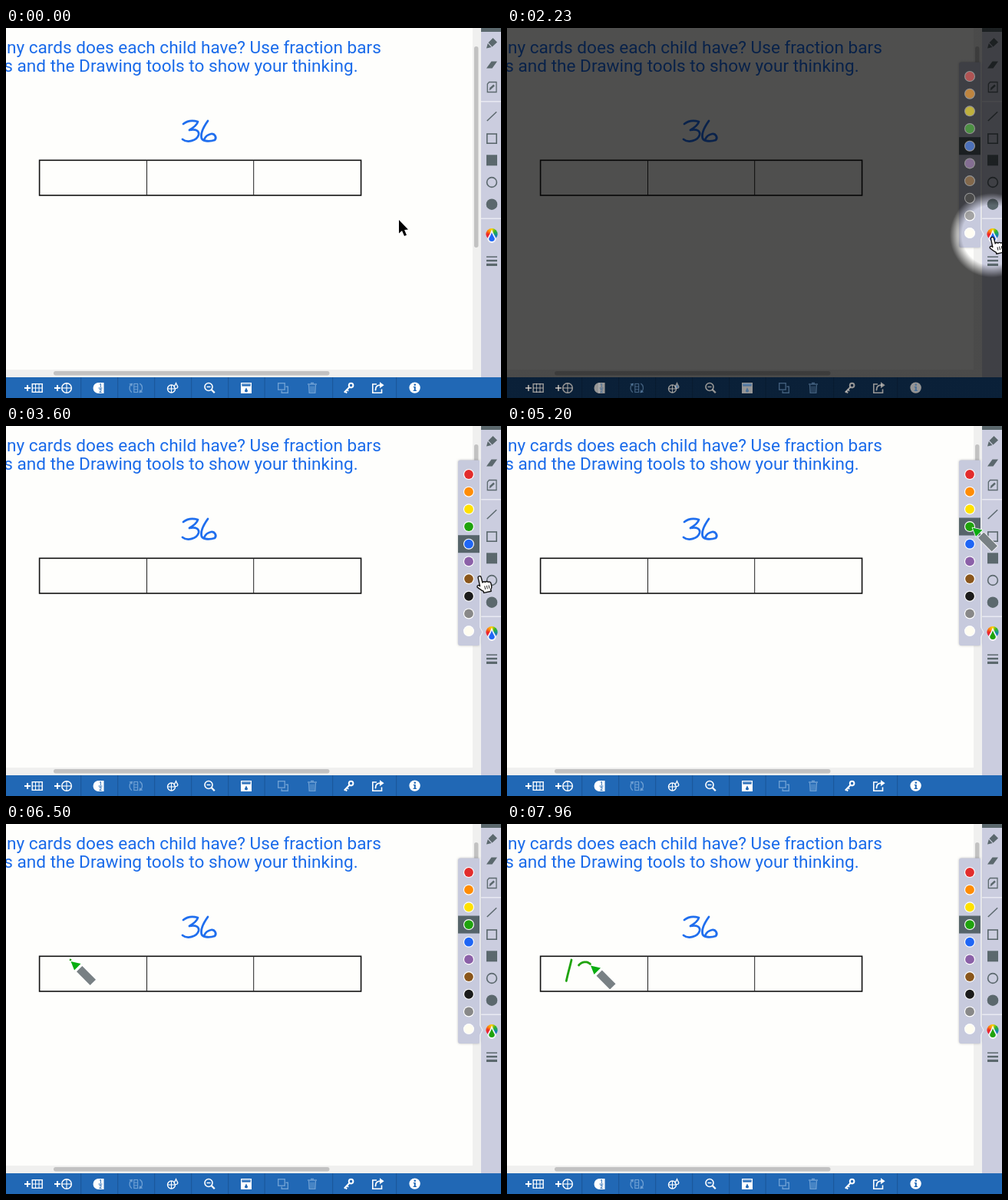
Recreate the animation shown at these times as an HTML page with a canvas. Size 645 px wide and 482 px high, loop 8 s.

```html
<!DOCTYPE html>
<html lang="en">
<head>
<meta charset="utf-8">
<title>Fraction bars</title>
<style>
html, body { margin: 0; width: 100%; height: 100%; overflow: hidden; background: #fefefc; }
canvas { display: block; }
</style>
</head>
<body>
<canvas id="stage" width="645" height="482"></canvas>
<script>
const ctx = document.getElementById('stage').getContext('2d');
const LOOP = 8000;
const INK = '#5b686d', BLUE = '#1f66f5', GREEN = '#1fa30c', BAR = '#2168b5', FADED = '#6d9fd3';
const PALETTE = ['#e22c2c', '#ff8c05', '#ffe100', GREEN, BLUE, '#8b60a8', '#8a561c', '#1b1b1b', '#888888', '#fffdf1'];
const LIGHT = { x: 632, y: 270 };

// Helpers
const clamp = v => Math.max(0, Math.min(1, v));
const part = (t, a, b) => clamp((t - a) / (b - a));
const ease = p => p * p * (3 - 2 * p);
const mix = (a, b, p) => [a[0] + (b[0] - a[0]) * p, a[1] + (b[1] - a[1]) * p];

function box(x, y, w, h, color) {
  ctx.fillStyle = color;
  ctx.fillRect(x, y, w, h);
}
function frame(x, y, w, h, color, width) {
  ctx.strokeStyle = color;
  ctx.lineWidth = width;
  ctx.strokeRect(x, y, w, h);
}
function line(points, color, width, close) {
  ctx.beginPath();
  points.forEach(p => ctx.lineTo(p[0], p[1]));
  if (close) ctx.closePath();
  ctx.strokeStyle = color;
  ctx.lineWidth = width;
  ctx.stroke();
}
function poly(points, color) {
  ctx.beginPath();
  points.forEach(p => ctx.lineTo(p[0], p[1]));
  ctx.closePath();
  ctx.fillStyle = color;
  ctx.fill();
}
function disc(x, y, r, color) {
  ctx.beginPath();
  ctx.arc(x, y, r, 0, 7);
  ctx.fillStyle = color;
  ctx.fill();
}
function ring(x, y, r, color, width, from = 0, to = Math.PI * 2) {
  ctx.beginPath();
  ctx.arc(x, y, r, from, to);
  ctx.strokeStyle = color;
  ctx.lineWidth = width;
  ctx.stroke();
}
function pill(x, y, w, h, r, color) {
  ctx.beginPath();
  ctx.roundRect(x, y, w, h, r);
  ctx.fillStyle = color;
  ctx.fill();
}
function label(text, x, y, font, color, align) {
  ctx.font = font;
  ctx.fillStyle = color;
  ctx.textAlign = align;
  ctx.fillText(text, x, y);
}
function drop(x, y, h, color) {
  const r = h * 0.33;
  ctx.beginPath();
  ctx.moveTo(x, y);
  ctx.quadraticCurveTo(x + r * 0.4, y + h * 0.35, x + r, y + h - r);
  ctx.arc(x, y + h - r, r, 0, Math.PI);
  ctx.quadraticCurveTo(x - r * 0.4, y + h * 0.35, x, y);
  ctx.fillStyle = color;
  ctx.fill();
}
function pen(d, color, width) {
  ctx.strokeStyle = color;
  ctx.lineWidth = width;
  ctx.lineCap = ctx.lineJoin = 'round';
  ctx.stroke(new Path2D(d));
  ctx.lineCap = 'butt';
  ctx.lineJoin = 'miter';
}

// Worksheet
function drawPage() {
  box(0, 0, 645, 482, '#fefefc');
  const font = '22.6px Roboto, sans-serif';
  label('any cards does each child have? Use fraction bars', 488.8, 32.5, font, '#1a6bea', 'right');
  label('s and the Drawing tools to show your thinking.', 458.6, 56.5, font, '#1a6bea', 'right');

  pen('M231 125 C236 121 243 120 250 122 C249 126 244 130 239 133 C247 131 252 134 251 139 C249 147 236 150 230 145', '#1f6eee', 2.8);
  pen('M263 121 C258 128 253 138 255 144 C257 148 266 148 272 146 C275 143 272 137 267 138 C262 139 259 143 258 146', '#1f6eee', 2.8);

  frame(43.6, 172.3, 419, 45.7, '#111', 1.6);
  line([[183.5, 172], [183.5, 218]], '#222', 1);
  line([[322.7, 172], [322.7, 218]], '#222', 1);
}

function drawScrollbars() {
  box(608, 0, 11, 455, '#f0f0ef');
  box(0, 445, 619, 10, '#f0f0ef');
  pill(610, 24, 5.5, 262, 2.7, '#c2c2c2');
  pill(62, 447, 359.5, 5.5, 2.7, '#c2c2c2');
}

// Right toolbar
function drawSidebar(ink) {
  box(619, 0, 26, 455, '#cbcddf');
  box(619, 0, 26, 5, INK);
  box(619, 95, 26, 1.5, '#e9eaf3');
  box(619, 247.5, 26, 1.5, '#e9eaf3');

  poly([[634.5, 13], [640, 18.5], [633.5, 24.5], [628.5, 19]], INK);
  poly([[627.8, 20], [632.5, 25], [626, 26.5]], INK);
  poly([[632.5, 43.5], [640, 43.5], [633.5, 52.5], [626, 52.5]], INK);
  line([[629.5, 70.5], [639, 70.5], [639, 83.5], [627.3, 83.5], [627.3, 73]], INK, 1.3, true);
  line([[630.5, 79.5], [636, 74.5]], INK, 2.4);
  line([[629.5, 80.5], [631.5, 80]], INK, 1);
  line([[626.8, 121], [639.2, 109.2]], INK, 1.5);
  frame(626.8, 138, 12.4, 12.2, INK, 1.6);
  box(626, 165.3, 14, 14, INK);
  ring(633, 201, 6.4, INK, 1.6);
  disc(633, 229.7, 7.3, INK);

  const wheel = ctx.createConicGradient(Math.PI / 2, 633, 268.5);
  ['#a03ac0', '#e8204a', '#ee2a22', '#ff8a10', '#ffd400', '#38b520', '#149a80', '#2060e0', '#5030c0']
    .forEach((c, i) => wheel.addColorStop(i / 8, c));
  disc(633, 268.5, 7.6, wheel);
  drop(633, 262.5, 17.5, '#f4f5fa');
  drop(633, 266.5, 11.5, ink);

  box(626, 297.4, 14, 1.5, INK);
  box(626, 301.9, 14, 2.4, INK);
  box(626, 306.8, 14, 3.2, INK);
}

// Bottom toolbar
function plus(x, y) {
  box(x - 4, y - 1, 8, 2, '#fff');
  box(x - 1, y - 4, 2, 8, '#fff');
}
function drawBarIcons() {
  const W = '#fff';
  plus(28, 469);
  frame(34.2, 463.7, 13, 10.6, W, 1.4);
  [38.5, 43].forEach(x => line([[x, 463], [x, 475]], W, 1));
  line([[34, 469], [47, 469]], W, 1);

  plus(67, 469);
  ring(79, 469, 6.3, W, 1.5);
  line([[79, 463], [79, 475]], W, 1.1);
  line([[73, 469], [85, 469]], W, 1.1);

  ctx.beginPath();
  ctx.arc(120.5, 469, 7, Math.PI / 2, Math.PI * 1.5);
  ctx.fillStyle = W;
  ctx.fill();
  box(119.5, 462, 8, 14, W);
  label('1', 123, 468, 'bold 6.5px Roboto, sans-serif', BAR, 'center');
  label('2', 123, 475.2, 'bold 6.5px Roboto, sans-serif', BAR, 'center');
  box(120.5, 468.6, 5, 0.9, BAR);

  frame(166.8, 463.5, 4.8, 11, FADED, 1.2);
  line([[167, 467.2], [171.5, 467.2]], FADED, 1);
  line([[167, 470.8], [171.5, 470.8]], FADED, 1);
  ring(168, 469, 7, FADED, 1.3, 2.2, 4.1);
  ring(170.5, 469, 7, FADED, 1.3, -1, 1);
  poly([[160.3, 463.5], [165.2, 462.8], [164.2, 467]], FADED);
  poly([[178.3, 474.5], [173.2, 475.2], [174.5, 471]], FADED);

  ring(215.5, 470, 5, W, 1.4);
  line([[215.5, 465], [215.5, 475]], W, 1.1);
  line([[210.5, 470], [220.5, 470]], W, 1.1);
  drop(221.5, 461, 9, W);
  drop(221.5, 464, 5, BAR);

  ring(264, 467.5, 5, W, 1.6);
  line([[261.5, 467.5], [266.5, 467.5]], W, 1.4);
  line([[267.6, 471], [271.8, 475.3]], W, 2.3);

  box(306, 462, 14, 14, W);
  box(307.4, 463.4, 11.2, 3.2, BAR);
  box(307.4, 463.4, 11.2, 1.4, '#73a2d5');
  drop(313, 468.3, 6.2, BAR);

  frame(354.7, 462.7, 8.5, 8.5, FADED, 1.4);
  line([[364.5, 467.2], [367.3, 467.2], [367.3, 475.3], [359.2, 475.3], [359.2, 472.5]], FADED, 1.4);

  box(393, 463.3, 12, 1.5, FADED);
  box(397, 461.8, 4, 1.6, FADED);
  line([[394.6, 465], [395.2, 475.3], [402.8, 475.3], [403.4, 465]], FADED, 1.4);
  [397, 399, 401].forEach(x => line([[x, 466.5], [x, 474]], FADED, 1));

  ring(449.6, 465.6, 2.8, W, 2);
  line([[447.5, 467.8], [440.8, 474.8]], W, 2);
  line([[441.6, 473], [444.2, 475.5]], W, 1.8);
  line([[444, 470.7], [446.2, 473]], W, 1.6);

  line([[483, 464], [477.8, 464], [477.8, 475.2], [489.5, 475.2], [489.5, 470.5]], W, 1.6);
  pen('M481.5 471.5 C481.5 467 484 465.2 488 465.2', W, 1.8);
  poly([[487, 461.3], [492.6, 465.2], [487, 469.2]], W);

  disc(532.6, 468.6, 7.2, W);
  disc(532.8, 464.8, 1.3, BAR);
  box(531.8, 467, 2, 5.6, BAR);
  box(530.8, 467, 2, 1.2, BAR);
  box(530.6, 471.8, 4.4, 1.2, BAR);
}
function drawBar() {
  box(0, 455, 645, 27, BAR);
  [97, 145, 193, 241, 289, 336.5, 425, 508].forEach(x => box(x, 455, 1.2, 27, '#1b589c'));
  drawBarIcons();
}

// Colour picker
const swatchY = i => 63 + i * 22.68;
function drawSwatches() {
  PALETTE.forEach((c, i) => {
    disc(603, swatchY(i), 7, '#fff');
    disc(603, swatchY(i), 5.9, c);
  });
}
function drawPicker(chosen) {
  ctx.shadowColor = 'rgba(0,0,0,.25)';
  ctx.shadowBlur = 3;
  pill(589, 44.5, 28.5, 241.5, 3, '#c7cadd');
  ctx.shadowBlur = 0;
  ctx.shadowColor = 'transparent';
  poly([[617, 262], [621, 268.5], [617, 275]], '#c7cadd');
  line([[617.6, 45], [617.6, 262], [621, 268.5], [617.6, 275], [617.6, 286]], '#eceef5', 1.1);
  box(589, swatchY(chosen) - 11.5, 28, 23, '#56646a');
  drawSwatches();
}

// Spotlight
function drawDim(amount) {
  const g = ctx.createRadialGradient(LIGHT.x, LIGHT.y, 39, LIGHT.x, LIGHT.y, 55);
  g.addColorStop(0, 'rgba(0,0,0,0)');
  g.addColorStop(1, `rgba(0,0,0,${0.69 * amount})`);
  box(0, 0, 645, 482, g);
}

// Cursors, each with its tip at the given point
function at(pos, draw) {
  ctx.save();
  ctx.translate(pos[0], pos[1]);
  ctx.lineJoin = 'round';
  draw();
  ctx.restore();
}
function drawArrow(pos) {
  const shape = [[0, 0], [0, 17.5], [4, 14], [7, 21], [10, 19.7], [7.1, 13], [12, 12.6]];
  at(pos, () => {
    line(shape, '#fff', 2.4, true);
    poly(shape, '#000');
  });
}
function drawHand(pos) {
  const shape = new Path2D('M-2 2 Q-2 0 0 0 Q2 0 2 2 L2.3 9 Q4 7.2 6 9.2 Q8 8 9.6 10 Q12 9.4 12.8 12 L12.8 16 Q12.6 18.5 10.8 20 L10.8 22.5 L1 22.5 L1 20.5 Q-2 18 -5.6 13.6 Q-6 11 -3.4 11.2 L-2 12.8 Z');
  at(pos, () => {
    ctx.rotate(-0.22);
    ctx.fillStyle = '#fff';
    ctx.fill(shape);
    ctx.strokeStyle = '#111';
    ctx.lineWidth = 1.4;
    ctx.stroke(shape);
    [4, 6.7, 9.4].forEach(x => line([[x, 14], [x, 18.5]], '#222', 1));
  });
}
function drawMarker(pos) {
  const nib = [[0.5, 2], [13.5, 5], [5, 13.5]];
  const body = [[8, 15.3], [15.3, 8], [33, 25.8], [25.6, 33]];
  at(pos, () => {
    line(nib, '#fff', 1.6, true);
    line(body, '#fff', 1.6, true);
    poly(body, '#788084');
    poly(nib, '#08ad10');
  });
}

// Motion
const bezier = (a, b, c, d, p) => {
  const q = 1 - p;
  return [0, 1].map(k => q * q * q * a[k] + 3 * q * q * p * b[k] + 3 * q * p * p * c[k] + p * p * p * d[k]);
};
const one = p => bezier([84, 177], [82, 186], [79, 196], [77.3, 204.5], p);
const two = p => bezier([93.5, 184], [97, 179.5], [104, 178], [108.5, 182.5], p);

const oneDone = t => ease(part(t, 6500, 6960));
const twoDone = t => part(t, 7500, 7960);

function drawStroke(path, done) {
  const points = [];
  for (let i = 0; i <= 16; i++) points.push(path(done * i / 16));
  ctx.lineCap = 'round';
  line(points, GREEN, 2.8);
  ctx.lineCap = 'butt';
}
function arrowPos(t) {
  if (t < 1080) return mix([512, 250], [630, 271], ease(part(t, 230, 1060)));
  return mix([630, 271], [635.5, 272], part(t, 1070, 1200));
}
function markerPos(t) {
  if (t < 6500) return mix([606, 130.5], [84, 177], ease(part(t, 5430, 6200)));
  if (t < 6990) return one(oneDone(t));
  if (t < 7500) return mix(one(1), two(0), ease(part(t, 6990, 7480)));
  return two(twoDone(t));
}
function drawCursor(t) {
  if (t < 1630) drawArrow(arrowPos(t));
  else if (t < 5200) drawHand(mix([632, 272.5], [604, 131.5], ease(part(t, 3230, 3930))));
  else drawMarker(markerPos(t));
}

function draw(t) {
  const picked = t >= 4400, open = t >= 2230;
  const dim = t < 3000 ? part(t, 1560, 2000) : 0;

  drawPage();
  drawScrollbars();
  drawSidebar(picked ? GREEN : BLUE);
  drawBar();
  if (open) drawPicker(picked ? 3 : 4);
  if (t >= 6500) drawStroke(one, oneDone(t));
  if (t >= 7500) drawStroke(two, twoDone(t));

  if (dim > 0) {
    drawDim(dim);
    // Small bright marks stay clearer than the surface around them
    ctx.globalAlpha = 0.4 * dim;
    drawBarIcons();
    if (open) drawSwatches();
    ctx.globalAlpha = 1;
  }
  drawCursor(t);
}

const start = performance.now();
function tick() {
  draw((performance.now() - start) % LOOP);
  requestAnimationFrame(tick);
}
tick();
</script>
</body>
</html>
```
